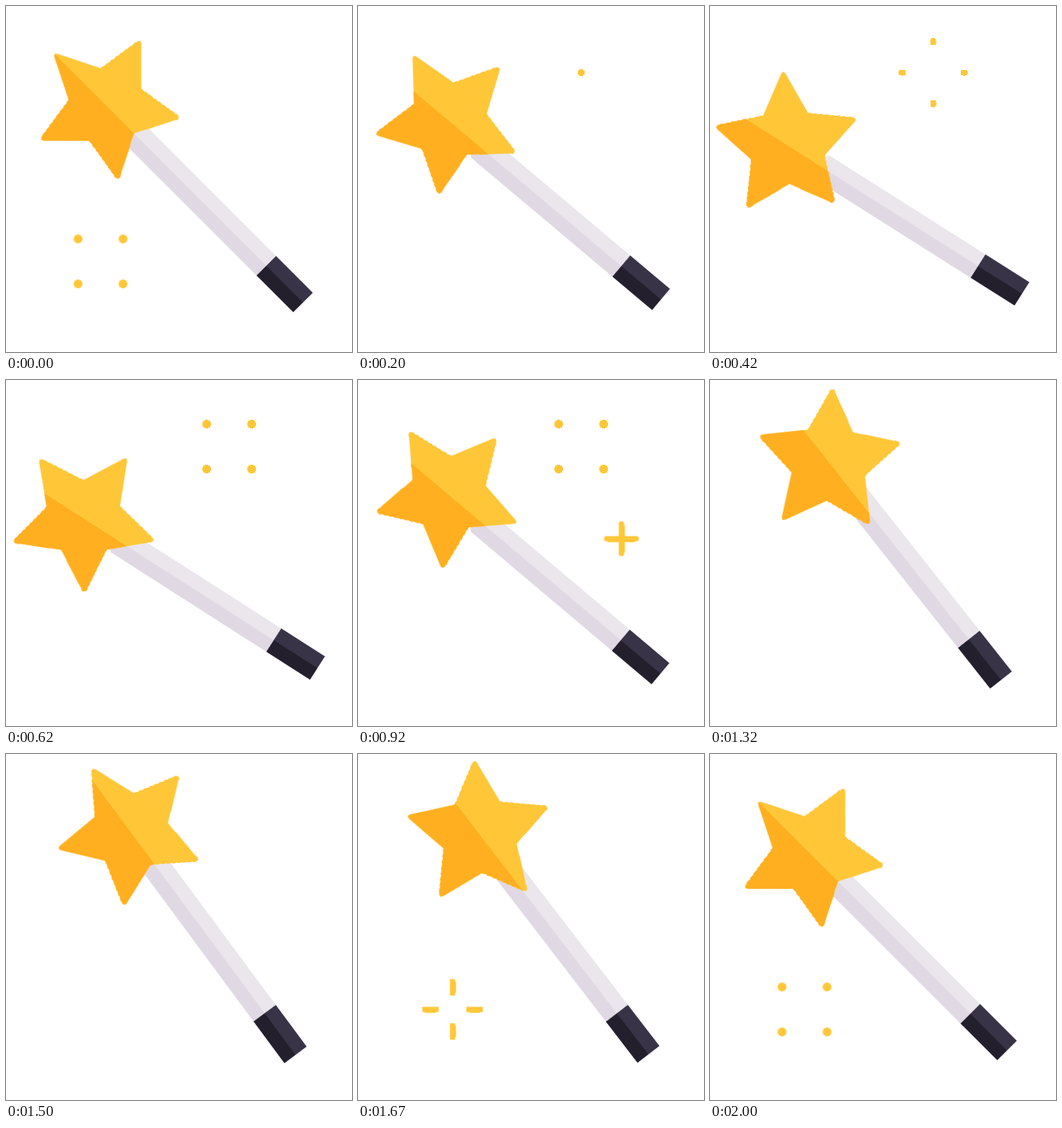
Animation, 400 px wide and 400 px high, one loop 2020 ms. Source, as an HTML page:

```html
<!DOCTYPE html>
<html lang="en">
<head>
<meta charset="utf-8">
<title>Magic wand</title>
<style>
  html, body { margin: 0; width: 100%; height: 100%; overflow: hidden; background: #fff; }
  svg { display: block; width: 100%; height: 100%; shape-rendering: crispEdges; }

  .wand, .spin, .rays, .dots { animation: 2020ms linear infinite; }

  .wand {
    transform-origin: 308px 268px;
    animation-name: swing, drift;
    animation-timing-function: cubic-bezier(.333, 0, .667, 1);
  }
  .spin { animation-name: spin; animation-timing-function: cubic-bezier(.41, .2, .585, .805); }

  .light { fill: #ffc738; stroke: #ffc738; }
  .dark { fill: #ffaf20; stroke: #ffaf20; }
  .star { stroke-width: 6; stroke-linejoin: round; }

  .rays, .dots { fill: none; stroke: #ffc738; stroke-linecap: round; }
  .rays { stroke-width: 7; animation-name: burst; animation-delay: var(--delay); }
  .dots { stroke-width: 10; animation-timing-function: step-end; }

  @keyframes swing {
    0% { transform: rotate(0deg); }
    24.26% { transform: rotate(-13.4deg); }
    74.26%, 78.22% { transform: rotate(8.5deg); }
    99.01%, 100% { transform: rotate(0deg); }
  }
  @keyframes drift {
    0%, 49.5%, 99.01%, 100% { translate: 0px 0px; }
    24.26% { translate: 1.8px -.5px; }
    74.26%, 78.22% { translate: 2.8px .7px; }
  }
  @keyframes spin {
    0% { transform: rotate(0deg); }
    99.01%, 100% { transform: rotate(360deg); }
  }
  /* A dash runs outwards along each ray and shrinks at its end. */
  @keyframes burst {
    0% { stroke-dasharray: 0 99; stroke-dashoffset: 0; opacity: 1; }
    2.97% { stroke-dasharray: 16 99; stroke-dashoffset: 0; }
    5.45% { stroke-dasharray: 13 99; stroke-dashoffset: -19; }
    10.9% { stroke-dasharray: 1.5 99; stroke-dashoffset: -35; }
    12.87% { stroke-dasharray: .5 99; stroke-dashoffset: -36; opacity: 1; }
    12.88%, 100% { stroke-dasharray: .5 99; stroke-dashoffset: -36; opacity: 0; }
  }
  @keyframes topDots {
    0%, 49.5%, 100% { opacity: 0; }
    22.3% { opacity: 1; }
  }
  @keyframes sideDots {
    0%, 62.4%, 100% { opacity: 0; }
    55.45% { opacity: 1; }
  }
  @keyframes lowDots {
    0%, 90.1%, 100% { opacity: 1; }
    7.4% { opacity: 0; }
  }
</style>
</head>
<body>
<svg viewBox="0 0 400 400">
  <defs>
    <path id="star" d="M-81.5 0L-33.3-24.2L-25.2-77.5L12.7-39.2L65.9-47.9L41.2 0L65.9 47.9L12.7 39.2L-25.2 77.5L-33.3 24.2Z"/>
    <path id="rays" d="M0 0V-37M0 0H37M0 0V37M0 0H-37"/>
    <path id="dots" d="M-26-26h.01M26-26h.01M-26 26h.01M26 26h.01"/>
    <clipPath id="lower"><rect x="-100" width="500" height="100"/></clipPath>
  </defs>

  <g class="wand">
    <g transform="translate(116.4 115.8) rotate(45)">
      <rect x="44" y="-15.8" width="226" height="31.6" rx="5" fill="#eae6ec"/>
      <rect x="261" y="-15.8" width="59.5" height="31.6" fill="#393347"/>
      <g clip-path="url(#lower)">
        <rect x="44" y="-15.8" width="226" height="31.6" rx="5" fill="#e0d9e3"/>
        <rect x="261" y="-15.8" width="59.5" height="31.6" fill="#231f2d"/>
      </g>
      <g class="spin"><use href="#star" class="star light"/></g>
      <g clip-path="url(#lower)">
        <g class="spin"><use href="#star" class="star dark"/></g>
      </g>
    </g>
  </g>

  <g transform="translate(258 77)">
    <use href="#rays" class="rays" style="--delay: -1820ms"/>
    <use href="#dots" class="dots" style="animation-name: topDots"/>
  </g>
  <g transform="translate(304.5 183.5)">
    <use href="#rays" class="rays" style="--delay: -1160ms"/>
    <use href="#dots" class="dots" style="animation-name: sideDots"/>
  </g>
  <g transform="translate(109.3 295.3)">
    <use href="#rays" class="rays" style="--delay: -460ms"/>
    <use href="#dots" class="dots" style="animation-name: lowDots"/>
  </g>
</svg>
</body>
</html>
```
